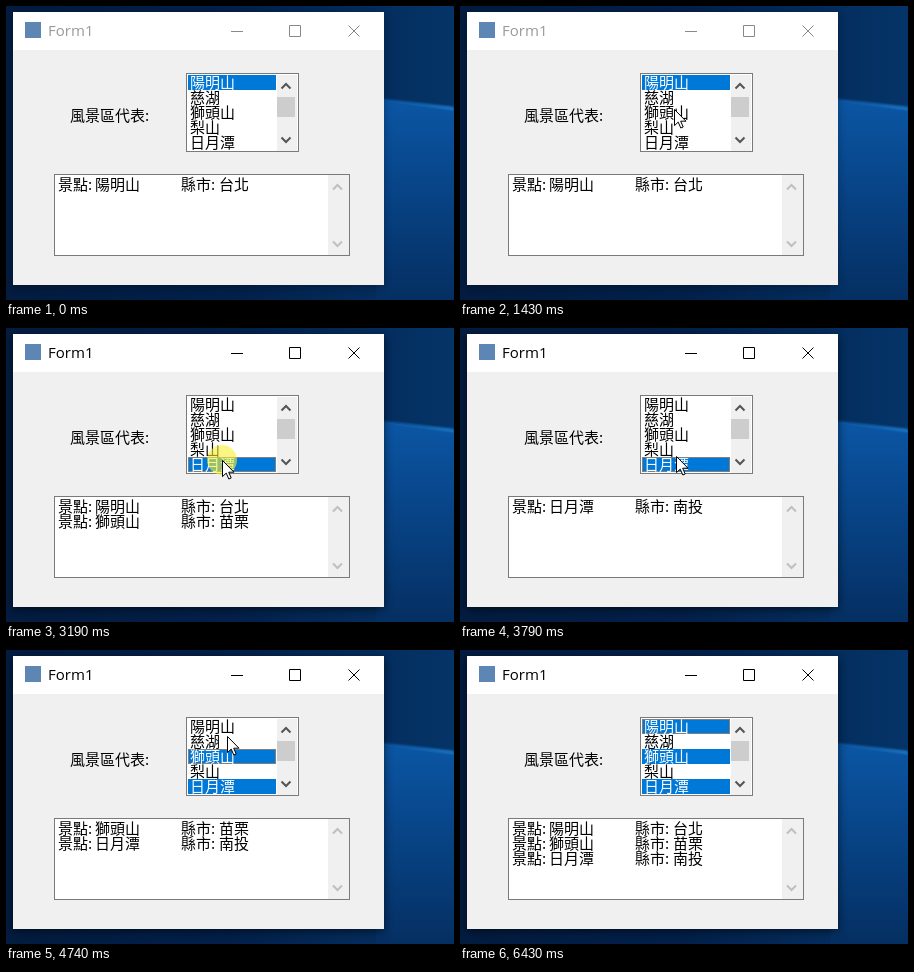
Recreate the animation shown at these times as an HTML page. Size 448x294 px, loop 7.03 s.

```html
<!DOCTYPE html>
<html lang="zh-Hant">
<head>
<meta charset="utf-8">
<title>Form1</title>
<style>
  html, body { margin: 0; width: 100%; height: 100%; overflow: hidden; background: #03244f; }
  svg { display: block; width: 448px; height: 294px; }
  text { font: 15px "Noto Sans CJK TC", "Noto Sans CJK", sans-serif; fill: #000; }
  #title { font: 15px "Open Sans", "Noto Sans", sans-serif; }
  .line { fill: none; stroke: #000; }
  .frame { fill: #fff; stroke: #7a7a7a; }
  .chevron { fill: none; stroke-width: 2; }
</style>
</head>
<body>
<svg id="stage" viewBox="0 0 448 294">
  <defs>
    <linearGradient id="sky" x1="0" y1="0" x2="1" y2="0">
      <stop offset="0" stop-color="#031c40"/>
      <stop offset=".5" stop-color="#02204a"/>
      <stop offset="1" stop-color="#053468"/>
    </linearGradient>
    <linearGradient id="floor" x1="0" y1="0" x2="0" y2="1">
      <stop offset="0" stop-color="#0b56a4"/>
      <stop offset=".4" stop-color="#08468a"/>
      <stop offset="1" stop-color="#052f62"/>
    </linearGradient>
    <linearGradient id="beam" x1="0" y1="0" x2="1" y2="0">
      <stop offset="0" stop-color="#0c4f9a"/>
      <stop offset="1" stop-color="#1f7fd0"/>
    </linearGradient>
    <filter id="soft" x="-10%" y="-10%" width="120%" height="120%"><feGaussianBlur stdDeviation="5"/></filter>
    <filter id="glow" x="-10%" y="-200%" width="120%" height="500%"><feGaussianBlur stdDeviation="1"/></filter>
  </defs>

  <rect width="448" height="294" fill="url(#sky)"/>
  <path d="M370 93L448 103V294H370Z" fill="url(#floor)"/>
  <path d="M370 92L448 101V104L370 94Z" fill="url(#beam)" filter="url(#glow)"/>
  <rect id="shadow" x="7" y="9" width="371" height="272" filter="url(#soft)"/>

  <rect x="7" y="6" width="371" height="273" fill="#f0f0f0"/>
  <rect x="7" y="6" width="371" height="38" fill="#fff"/>
  <rect x="19" y="16" width="16" height="16" fill="#5d86b5"/>
  <text id="title" x="42" y="30">Form1</text>
  <path id="buttons" class="line" d="M225 25.5H237M283.5 19.5h11v11h-11ZM342.5 19.5l11 11M353.5 19.5l-11 11"/>

  <text x="64" y="115">風景區代表:</text>
  <rect class="frame" x="180.5" y="67.5" width="112" height="78"/>
  <rect x="271" y="69" width="20" height="76" fill="#f0f0f0"/>
  <rect x="271" y="91" width="18" height="20" fill="#cdcdcd"/>
  <path class="chevron" stroke="#555" d="M275.5 82.5l4.5-4.5 4.5 4.5M275.5 131.5l4.5 4.5 4.5-4.5"/>
  <g id="list"></g>

  <rect class="frame" x="48.5" y="168.5" width="295" height="81"/>
  <rect x="322" y="169" width="21" height="80" fill="#f0f0f0"/>
  <path class="chevron" stroke="#bfbfbf" d="M327 183.5l4.5-4.5 4.5 4.5M327 235.5l4.5 4.5 4.5-4.5"/>
  <g id="output"></g>

  <circle id="press" r="15" fill="#f8f030" fill-opacity=".6"/>
  <path id="cursor" d="M.5 .5V16.6L4.2 13.1 6.8 19 9.2 18 6.7 12.2H12Z" fill="#fff" stroke="#000"/>
</svg>

<script>
const LOOP = 7030, TICK = 67.6, ROW = 15;
const spots = ['陽明山', '慈湖', '獅頭山', '梨山', '日月潭'];
const cities = { 0: '台北', 2: '苗栗', 4: '南投' };

// start, active, selected rows, focused row, printed rows, mouse held
const states = [
  [0,    false, [0],       -1, [0],       false],
  [2300, true,  [0, 2],     2, [0],       true],
  [2370, true,  [0, 2],     2, [0, 2],    false],
  [3190, true,  [4],        4, [0, 2],    true],
  [3320, true,  [4],        4, [4],       false],
  [4330, true,  [2, 4],     2, [4],       true],
  [4390, true,  [2, 4],     2, [2, 4],    false],
  [4940, true,  [0, 2, 4],  0, [2, 4],    true],
  [5010, true,  [0, 2, 4],  0, [0, 2, 4], false]
];

const smooth = k => k * k * (3 - 2 * k);
const easeOut = k => 1 - (1 - k) ** 2;
const easeIn = k => k ** 1.5;

// time, x, y, easing towards this point
const path = [
  [600, 383, 278],
  [1284, 216, 105, easeOut],
  [1419, 214, 103, smooth],
  [1710, 217, 115, smooth],
  [2025, 212, 105, smooth],
  [2503, 212, 105, smooth],
  [2900, 216, 132, smooth],
  [3650, 216, 132, smooth],
  [4250, 218, 102, smooth],
  [4392, 218, 102, smooth],
  [4930, 223, 79, smooth],
  [6073, 223, 79, smooth],
  [6410, 358, 300, easeIn]
];
const SHOW = 610, HIDE = 6430;

const $ = id => document.getElementById(id);

function add(parent, tag, attrs, text = '') {
  const el = document.createElementNS('http://www.w3.org/2000/svg', tag);
  for (const key in attrs) el.setAttribute(key, attrs[key]);
  el.textContent = text;
  parent.append(el);
  return el;
}

const label = (parent, x, y, text) => add(parent, 'text', { x, y }, text);

const rows = spots.map((name, i) => {
  const y = 69 + i * ROW;
  return {
    bar: add($('list'), 'rect', { x: 182, y, width: 88, height: ROW, fill: '#0078d7' }),
    focus: add($('list'), 'rect', {
      x: 182.5, y: y + .5, width: 87, height: ROW - 1,
      fill: 'none', stroke: '#ff8728', 'stroke-dasharray': '1 1'
    }),
    text: label($('list'), 184, y + 13, name)
  };
});

const lines = [0, 1, 2].map(i => {
  const g = add($('output'), 'g', {}), y = 184 + i * ROW;
  label(g, 52, y, '景點:');
  label(g, 175, y, '縣市:');
  return { g, spot: label(g, 89, y, ''), city: label(g, 213, y, '') };
});

const show = (el, on) => { el.style.display = on ? '' : 'none'; };

function apply([, active, selected, focused, printed]) {
  $('title').style.fill = active ? '#000' : '#999';
  $('buttons').style.stroke = active ? '#000' : '#888';
  $('shadow').style.opacity = active ? .6 : .3;
  rows.forEach((row, i) => {
    const on = selected.includes(i);
    show(row.bar, on);
    show(row.focus, i === focused);
    row.text.style.fill = on ? '#fff' : '#000';
  });
  lines.forEach((line, i) => {
    const id = printed[i];
    show(line.g, id !== undefined);
    line.spot.textContent = spots[id] || '';
    line.city.textContent = cities[id] || '';
  });
}

function cursorAt(t) {
  const i = path.findIndex(p => p[0] > t);
  if (i === 0) return path[0].slice(1, 3);
  if (i < 0) return path[path.length - 1].slice(1, 3);
  const [t0, x0, y0] = path[i - 1], [t1, x1, y1, ease] = path[i];
  const k = ease((t - t0) / (t1 - t0));
  return [Math.round(x0 + (x1 - x0) * k), Math.round(y0 + (y1 - y0) * k)];
}

let current;
function draw(t) {
  const state = states.findLast(s => s[0] <= t);
  if (state !== current) apply(current = state);
  const tick = Math.floor((t + 12) / TICK) * TICK;
  const move = `translate(${cursorAt(tick)})`;
  $('cursor').setAttribute('transform', move);
  $('press').setAttribute('transform', move);
  show($('cursor'), t >= SHOW && t < HIDE);
  show($('press'), state[5]);
}

const start = performance.now();
function loop() {
  draw((performance.now() - start) % LOOP);
  requestAnimationFrame(loop);
}
loop();
</script>
</body>
</html>
```
